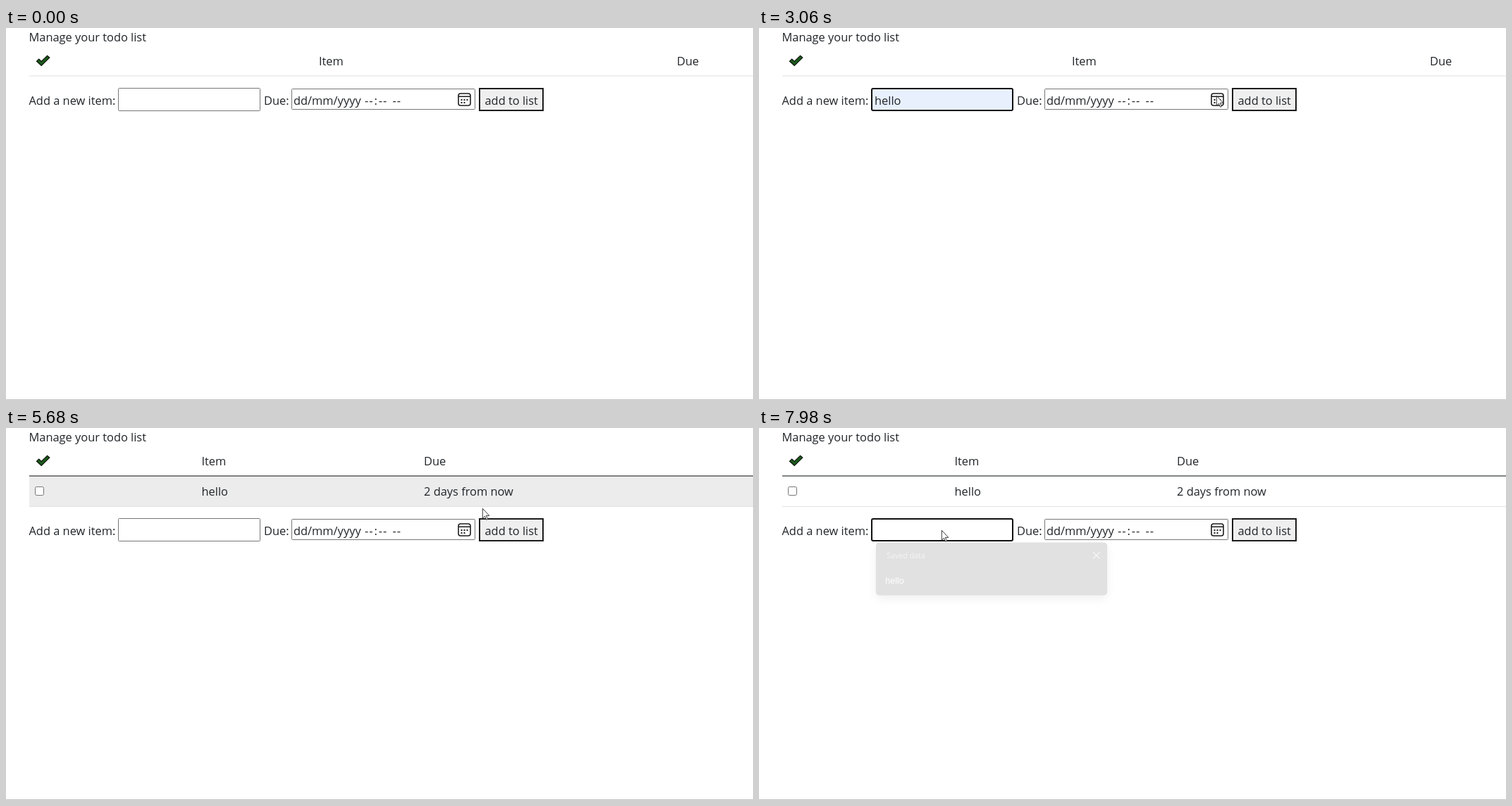
An HTML page with a canvas for the animation above (8 s loop, 1060 by 528 pixels).

```html
<!DOCTYPE html>
<html lang="en">
<head>
<meta charset="utf-8">
<title>Todo list</title>
<style>
html, body { margin: 0; width: 100%; height: 100%; overflow: hidden; background: #fff; }
canvas { display: block; }
</style>
</head>
<body>
<canvas id="stage" width="1060" height="528"></canvas>
<script>
const ctx = document.getElementById('stage').getContext('2d');
const LOOP = 8000;
const ADD_TIME = 5090;
const ROW = 43;
const UI = '"Open Sans", "Noto Sans", sans-serif';
const SANS = '"Liberation Sans", Arial, sans-serif';
const INK = '#212529';

// Pointer moves, each eased from the last place
const MOVES = [
  { from: 130, to: 740, x: 262, y: 101 },
  { from: 1340, to: 2100, x: 411, y: 164.5 },
  { from: 2400, to: 2920, x: 649, y: 96 },
  { from: 3250, to: 4430, x: 715, y: 110 },
  { from: 5610, to: 5680, x: 676, y: 114 },
  { from: 5680, to: 6170, x: 261, y: 146 },
  { from: 7700, to: 7770, x: 259, y: 145 }
];

const ARROW = new Path2D('M.3 .3V14.2L3.4 11.2L5.7 16.3L7.6 15.4L5.4 10.4H9.8Z');
const HAND = new Path2D('M-2 1.5Q-.5 -1 1 1.5V7L3 6.5Q5 6.5 5 8Q8 7.5 8 10V14Q7 16 6.5 19.5H-1Q-2 16 -6 11.5Q-5 9 -2 12Z');
const TICK = new Path2D('M43.5 47.2L46.7 44.1L50.2 47.4L58.6 39.3L61.8 42.1L50.2 53.5Z');

const within = (t, a, b) => t >= a && t < b;
const ramp = (t, start, length) => Math.min(1, Math.max(0, (t - start) / length));
const ease = k => k * k * (3 - 2 * k);

function pointerAt(t) {
  let x = 777, y = 443;
  for (const m of MOVES) {
    const k = ease(ramp(t, m.from, m.to - m.from));
    x += (m.x - x) * k;
    y += (m.y - y) * k;
  }
  return { x, y };
}

function text(str, x, y, color = INK, font = '16.4px ' + UI, align = 'left') {
  ctx.font = font;
  ctx.fillStyle = color;
  ctx.textAlign = align;
  ctx.fillText(str, x, y);
}

function rect(x, y, w, h, color) {
  ctx.fillStyle = color;
  ctx.fillRect(x, y, w, h);
}

function box(x, y, w, h, r, fill, stroke, line = 1) {
  ctx.beginPath();
  ctx.roundRect(x, y, w, h, r);
  if (fill) { ctx.fillStyle = fill; ctx.fill(); }
  if (stroke) { ctx.strokeStyle = stroke; ctx.lineWidth = line; ctx.stroke(); }
}

function shape(path, fill, stroke, line) {
  ctx.fillStyle = fill;
  ctx.fill(path);
  ctx.strokeStyle = stroke;
  ctx.lineWidth = line;
  ctx.stroke(path);
}

function strokePath(d, color, line) {
  ctx.strokeStyle = color;
  ctx.lineWidth = line;
  ctx.stroke(new Path2D(d));
}

function table(added, hovered) {
  text('Manage your todo list', 32.5, 19);
  shape(TICK, '#1c5a1c', '#0a140a', 1.2);
  text('Item', added ? 277.5 : 444, 53);
  text('Due', added ? 593 : 952, 53);
  if (added) {
    if (hovered) rect(33, 68, 1027, 43, '#ececec');
    rect(33, 67.4, 1027, 1.3, '#404346');
    box(41.5, 83.5, 12, 12, 2, '#fff', '#767676');
    text('hello', 277.5, 96);
    text('2 days from now', 593, 96);
    rect(33, 111, 1027, 1, '#dee2e6');
  } else {
    rect(33, 67.5, 1027, 1, '#dee2e6');
  }
  rect(0, 527, 1060, 1, '#c4c4c4');
}

function calendarIcon() {
  box(642, 93, 17, 17, 3, null, '#1d1d1d', 1.6);
  rect(642, 96.5, 17, 1.5, '#1d1d1d');
  for (let i = 0; i < 5; i++)
    rect(645.5 + i % 3 * 4, 101 + Math.floor(i / 3) * 4, 2, 2, '#1d1d1d');
}

function field(x, y, w, h, focused, fill) {
  if (focused) box(x + 1, 86, w - 2, 31, 2, fill, '#101010', 2);
  else box(x + .5, y + .5, w - 1, h - 1, 1, fill, '#767676');
}

function form(s) {
  text('Add a new item:', 32.5, 109);
  field(159, 85, 202, 33, s.focus, s.filled ? '#e8f0fe' : '#fff');
  text(s.value, 164, 109);
  if (s.caret) rect(163 + ctx.measureText(s.value).width, 90, 1.6, 23, '#000');

  text('Due:', 366, 109);
  field(405, 86, 261, 30, s.picker, '#fff');
  text('dd/mm/yyyy', 408, 109);
  for (let i = 0; i < 6; i++)
    text('-', 509 + Math.floor(i / 2) * 19.8 + i % 2 * 6.2, 109);
  text(':', 522.5, 109);
  calendarIcon();

  box(672, 86, 90, 31, 0, '#efefef', '#1c1c1c', 2);
  text('add to list', 679.5, 109);
}

// Suggestion list; the greys blend to white as it fades
function suggestions(alpha, hovered) {
  if (alpha <= 0) return;
  const grey = v => {
    const g = Math.round(255 - (255 - v) * alpha);
    return `rgb(${g},${g},${g})`;
  };
  const scale = 1 - .048 * (1 - alpha);
  ctx.save();
  ctx.translate(330, 157);
  ctx.scale(scale, scale);
  ctx.translate(-330, -157);
  ctx.save();
  ctx.shadowColor = `rgba(0,0,0,${.36 * alpha})`;
  ctx.shadowBlur = 14;
  ctx.shadowOffsetY = 5;
  box(159, 118, 342, 78, 5, grey(74));
  ctx.restore();
  text('Saved data', 175, 141.7, grey(188), '11.1px ' + UI);
  strokePath('M480 132l10 10m0 -10l-10 10', grey(222), 1.1);
  if (hovered) {
    box(163.5, 155, 297, 37, 2, grey(120));
    strokePath('M471 167h16m-10 4v7m4 -7v7M476.5 167v-2.5h5v2.5M473 167l1 14.5h10l1 -14.5', grey(200), 1.1);
  }
  text('hello', 173, 179, grey(255), (hovered ? 'bold 12px ' : '13px ') + SANS);
  ctx.restore();
}

function picker() {
  const font = '13px ' + UI, dark = '#101010', blue = '#0067c0';
  box(405.5, 117.5, 420, 305, 2, '#fff', '#bfbfbf');
  text('March 2022', 419, 145, dark, '600 13px ' + UI);
  strokePath('M610 144v-10l-4 4m4 -4l4 4M640 134v10l-4 -4m4 4l4 -4', '#303030', 1.4);
  for (let i = 0; i < 49; i++) {
    const x = 430 + i % 7 * 34, y = 176 + Math.floor(i / 7) * 32;
    const day = new Date(2022, 1, 20 + i);
    const name = day.toLocaleDateString('en', { weekday: 'short' }).slice(0, 2);
    const dim = i >= 7 && day.getMonth() !== 2;
    text(i < 7 ? name : day.getDate(), x, y, dim ? '#8a8a8a' : dark, font, 'center');
  }
  text('Clear', 419, 408, blue, font);
  text('Today', 608, 408, blue, font);
  rect(660, 118, 1, 304, '#dcdcdc');
  const columns = [i => (9 + i) % 12 + 1, i => 24 + i, i => ['AM', 'PM'][i] || ''];
  columns.forEach((label, col) => {
    const x = 689 + col * 52;
    box(x - 23, 124, 46, 34, 2, blue);
    for (let i = 0; i < 7; i++)
      text(String(label(i)).padStart(2, col < 2 ? '0' : ' '), x, 146 + i * 41, i ? dark : '#fff', font, 'center');
  });
}

function pointer({ x, y }, kind) {
  ctx.save();
  ctx.translate(x, y);
  if (kind === 'beam') {
    strokePath('M-3 -7h6m-3 0v14m-3 0h6', '#111', 1.2);
  } else if (kind === 'hand') {
    shape(HAND, '#fff', '#222', 1);
    strokePath('M1 7v3M3.3 7v3M5.4 8v2.5', '#222', .9);
  } else {
    shape(ARROW, '#fff', '#222', .9);
  }
  ctx.restore();
}

function typed(t, preview) {
  if (preview || within(t, 2100, ADD_TIME)) return 'hello';
  if (within(t, 7240, 7700)) return 'he';
  return within(t, 7040, 7770) ? 'h' : '';
}

function listAlpha(t) {
  return t < ADD_TIME
    ? ramp(t, 700, 150) - ramp(t, 2335, 165)
    : ramp(t, 6170, 120) - ramp(t, 7843, 165);
}

function draw(t) {
  const pos = pointerAt(t);
  const added = t >= ADD_TIME;
  const dy = added ? ROW : 0;
  const preview = within(t, 1340, 2500) && pos.y > 155;
  const open = within(t, 3190, 4060);
  const inLine = within(pos.y, 85 + dy, 118 + dy);
  const overInput = inLine && within(pos.x, 159, 361);
  const overButton = inLine && within(pos.x, 671, 763);

  rect(0, 0, 1060, 528, '#fff');
  table(added, t < 5740);
  ctx.save();
  ctx.translate(0, dy);
  form({
    value: typed(t, preview),
    filled: preview || within(t, 2100, ADD_TIME),
    focus: within(t, 730, 3120) || t >= 6160,
    caret: within(t, 730, 1340) || within(t, 2300, 2850) || within(t, 6160, 6710) || within(t, 7040, 7740),
    picker: open
  });
  suggestions(listAlpha(t), preview);
  if (open) picker();
  ctx.restore();

  if (t >= 130) pointer(pos, overInput && t < 7770 ? 'beam' : overButton ? 'hand' : 'arrow');
}

const begin = performance.now();
function frame() {
  draw((performance.now() - begin) % LOOP);
  requestAnimationFrame(frame);
}
frame();
</script>
</body>
</html>
```
